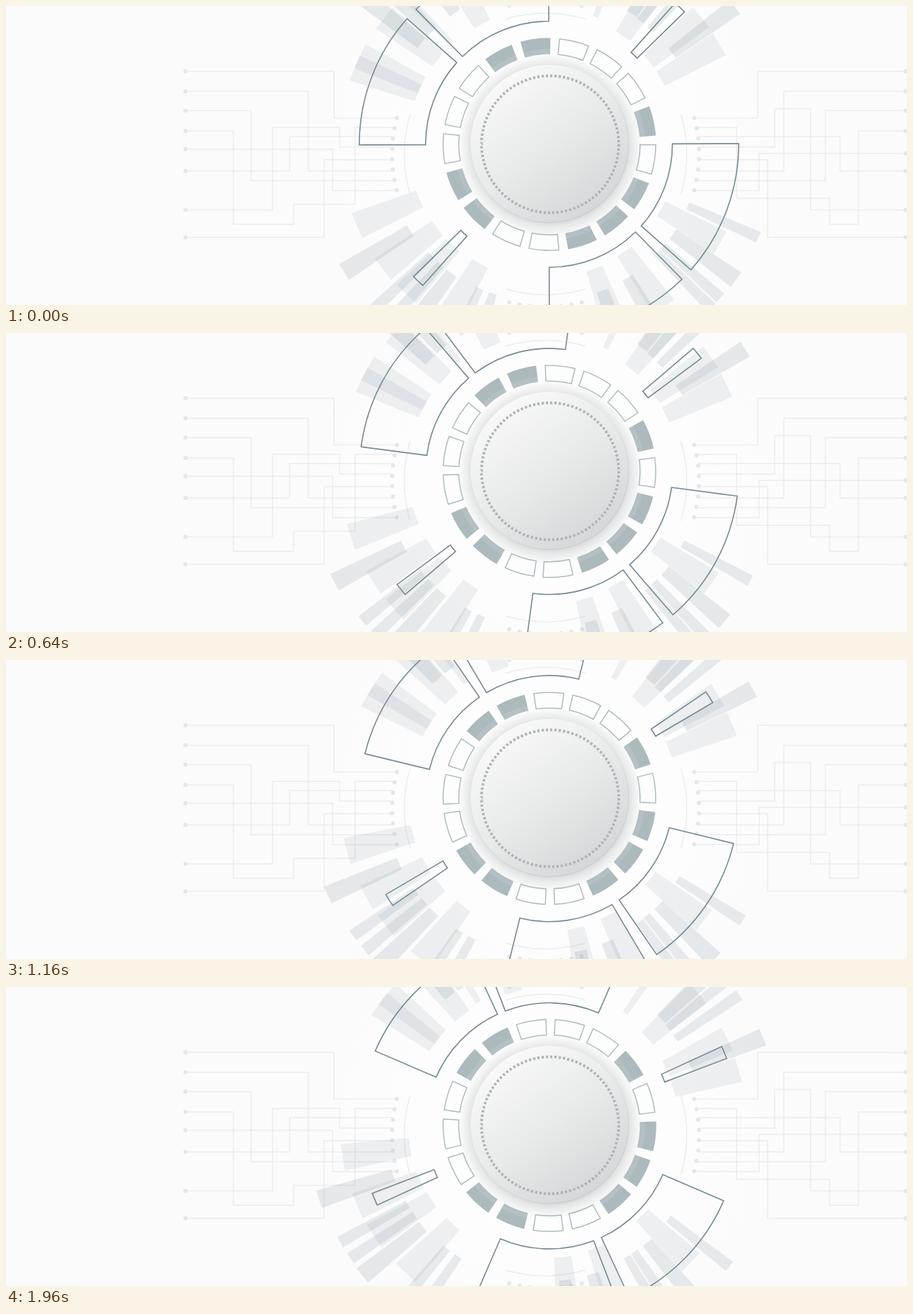
An HTML page that plays this animation: 1280x426 px, repeating every 2000 ms.

```html
<!DOCTYPE html>
<html lang="en">
<head>
<meta charset="utf-8">
<title>Rotating dial</title>
<style>
html, body { margin: 0; width: 100%; height: 100%; overflow: hidden; background: #fbfbfb; }
svg { display: block; width: 100vw; height: 100vh; }
</style>
</head>
<body>
<svg viewBox="0 0 1280 426">
  <defs>
    <radialGradient id="glow" gradientUnits="userSpaceOnUse" cx="772" cy="197" r="330">
      <stop offset=".35" stop-color="#fefefe"/>
      <stop offset="1" stop-color="#fbfbfb"/>
    </radialGradient>
    <radialGradient id="shade">
      <stop offset=".8" stop-color="#8a8f92" stop-opacity=".42"/>
      <stop offset=".88" stop-color="#8a8f92" stop-opacity=".2"/>
      <stop offset="1" stop-color="#8a8f92" stop-opacity="0"/>
    </radialGradient>
    <linearGradient id="face" x1=".2" y1=".1" x2=".8" y2=".93">
      <stop offset="0" stop-color="#f8f8f8"/>
      <stop offset=".5" stop-color="#e8e9e9"/>
      <stop offset="1" stop-color="#d5d6d7"/>
    </linearGradient>
    <linearGradient id="rim" x1=".2" y1=".1" x2=".8" y2=".93">
      <stop offset="0" stop-color="#fdfdfd"/>
      <stop offset="1" stop-color="#c3c5c7"/>
    </linearGradient>
  </defs>
  <rect width="1280" height="426" fill="url(#glow)"/>
  <g id="circuit" fill="none" stroke="#ebeded" stroke-width="1.5"/>
  <g id="dots" fill="#e5e8e8"/>
  <g id="bars" fill="#758893"/>
  <g id="frames" fill="none" stroke="#738a92" stroke-width="1.6"/>
  <g id="ring" stroke-width="1.5"/>
  <circle cx="773" cy="199" r="131" fill="url(#shade)"/>
  <circle cx="772.5" cy="196.5" r="112" fill="url(#face)" stroke="url(#rim)"/>
  <circle cx="773" cy="197" r="97.5" fill="none" stroke="#adb5b9" stroke-width="3.8"
    pathLength="600" stroke-dasharray="3.2 2.8"/>
</svg>
<script>
const LOOP = 2000, STEP = 40;
const layer = id => document.getElementById(id);

function add(id, tag, attrs) {
  const el = document.createElementNS('http://www.w3.org/2000/svg', tag);
  for (const key in attrs) el.setAttribute(key, attrs[key]);
  layer(id).appendChild(el);
}

// Wheels are built around the origin, angles in degrees clockwise from the right
function polar(angle, r) {
  const a = angle * Math.PI / 180;
  return (r * Math.cos(a)).toFixed(2) + ' ' + (r * Math.sin(a)).toFixed(2);
}

function sector(a, b, r0, r1) {
  return `M${polar(a, r0)}L${polar(a, r1)}A${r1} ${r1} 0 0 1 ${polar(b, r1)}` +
    `L${polar(b, r0)}A${r0} ${r0} 0 0 0 ${polar(a, r0)}Z`;
}

function wedge(a, b, r0, r1) {
  return `M${polar(a, r0)}L${polar(a, r1)}L${polar(b, r1)}L${polar(b, r0)}Z`;
}

// Circuit wires, each with a dot at its outer end
const wires = `255 93H466V159.5H556 255 121.5H429.5V235H551 255 149H348V249H553
  255 178H323V311H408.5V282.5H496V173H553 255 204H464V263H556 255 235H403V186H550
  255 290.5H378.5V173H474V201H550 255 329.5H452V219H550
  1278 93H1068V159.5H978 1278 121.5H1105V235H983 1278 149H1164V249H981
  1278 178H1211V311H1170V274H1038V173H981 1278 210H1070V263H978 1278 235H1185V186H983
  1278 290.5H1143V146H1092V201H984 1278 329.5H1082V219H984`;
for (const [wire, cx, cy] of wires.matchAll(/(\d+) ([\d.]+)H\S+/g)) {
  add('circuit', 'path', { d: 'M' + wire });
  add('dots', 'circle', { cx, cy, r: 3 });
}

// Faint arc and eight inner dots, repeated on four sides
for (let side = 0; side < 360; side += 90) {
  const transform = `translate(766.5 211) rotate(${side})`;
  add('circuit', 'path', {
    d: `M${polar(-16.4, 200.5)}A200.5 200.5 0 0 1 ${polar(16.4, 200.5)}`, transform
  });
  for (let i = -3.5; i < 4; i++) {
    add('dots', 'circle', { cx: 218 - 0.55 * i * i, cy: 14.7 * i, r: 3, transform });
  }
}

// Bar families; the whole burst leans slightly to the left
const families = [
  { span: 7.4, r0: 192, r1: 289, alpha: 0.115,
    at: [30, 55, 70, 120, 133.5, 143, 157, 201.5, 205, 217.5, 241, 304.3, 320, 329.5] },
  { span: 4.4, r0: 225, r1: 336, alpha: 0.17,
    at: [36, 59.6, 70, 127, 148, 218.5, 224, 234.5, 302.3, 323.4] },
  { span: 2.9, r0: 224, r1: 334, alpha: 0.155,
    at: [24, 42, 45.3, 110.5, 115.6, 132, 136.6, 306.5, 311.4] },
  { span: 2.4, r0: 196, r1: 292, alpha: 0.115, at: [226, 290] }
];
for (const { span, r0, r1, alpha, at } of families) {
  for (const mid of at) {
    const lean = 9 * Math.cos(mid * Math.PI / 180);
    add('bars', 'path', {
      d: wedge(mid - span / 2, mid + span / 2, r0 - lean, r1 - lean), 'fill-opacity': alpha
    });
  }
}

for (const turn of [0, 180]) {
  for (const [a, b] of [[0, 41.8], [45.7, 90.1], [131.9, 135.8]]) {
    add('frames', 'path', { d: sector(a + turn, b + turn, 175.3, 269.5) });
  }
}

// Seventeen ring tiles, 1 = filled
[...'10001011100110001'].forEach((on, i) => {
  const a = -105.7 + i * 360 / 17, b = a + 16.2;
  if (on === '1') {
    add('ring', 'path', { d: sector(a, b, 128.5, 151.8), fill: '#acb9bd' });
    add('ring', 'path', { d: sector(a, b, 128.5, 136), fill: '#fff', 'fill-opacity': 0.1 });
  } else {
    add('ring', 'path', { d: sector(a, b, 128.8, 151), fill: '#fdfdfd', stroke: '#aebcbf' });
  }
});

function spin(id, x, y, angle, dx = 0, dy = 0) {
  layer(id).setAttribute('transform',
    `translate(${x} ${y}) rotate(${angle.toFixed(3)}) translate(${dx} ${dy})`);
}

function draw(ms) {
  const t = Math.floor((ms % LOOP) / STEP) * STEP / 1000;
  spin('bars', 771.5, 197, 7.2 * t);
  spin('frames', 769.7, 199, 12 * t - 0.2, 1.7, -2);
  spin('ring', 772, 197.2, -12 * t);
}

const start = performance.now();
function tick() {
  draw(performance.now() - start);
  requestAnimationFrame(tick);
}
draw(0);
requestAnimationFrame(tick);
</script>
</body>
</html>
```
